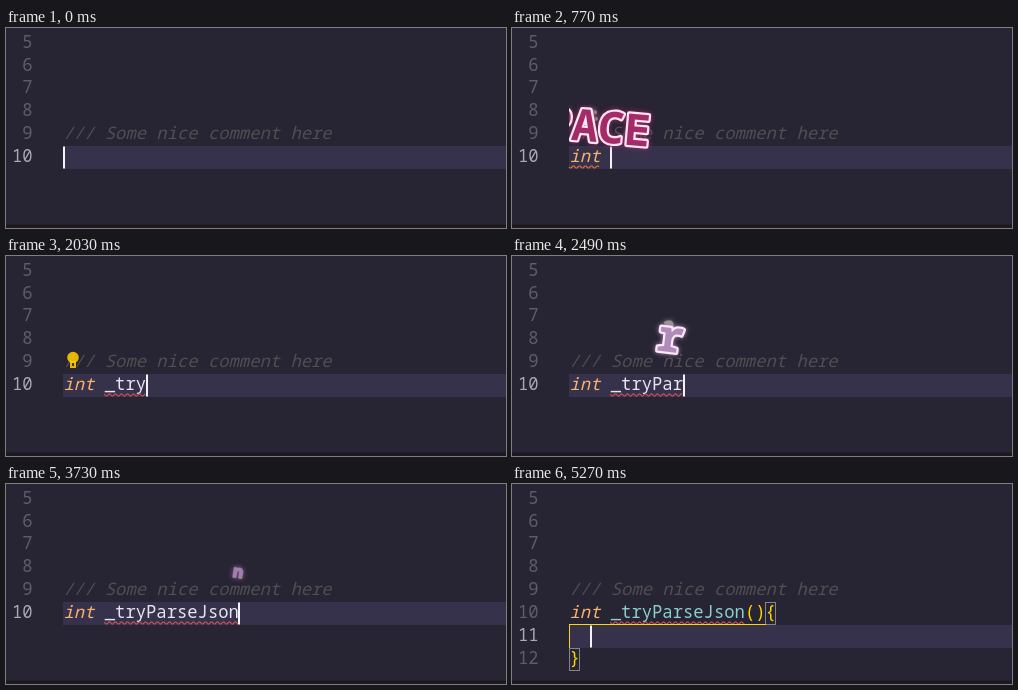
An HTML page with a canvas for the animation above (5430 ms loop, 500 by 200 pixels).

```html
<!DOCTYPE html>
<html>
<head>
<meta charset="utf-8">
<style>
html, body { margin: 0; width: 100%; height: 100%; overflow: hidden; background: #272433; }
canvas { display: block; }
</style>
</head>
<body>
<canvas id="stage" width="500" height="200"></canvas>
<script>
const ctx = document.getElementById('stage').getContext('2d');
const LOOP = 5430, LEFT = 57, CELL = 10.32, ROW = 22.85, LIFE = 330;
const MONO = '"Noto Sans Mono", "DejaVu Sans Mono", monospace';
const GOLD = '#ffd700', PINK = '#a52a68', LILAC = '#b08abb', GREY = '#a39e98';
const ENTER = 4940, SETTLED = 5270;

// time, typed text, label centre x and y, tilt in degrees, colour
const keys = [
  [300, 'i', 66, 91, -6, PINK],
  [415, 'n', 76, 90, 7, LILAC],
  [525, 't', 81, 88, -8, GREY],
  [700, ' ', 73, 97, 5, PINK],
  [1000, '_', 104, 100, 4, LILAC],
  [1160, 't', 112, 95, -7, GREY],
  [1400, 'r', 126, 78, 8, PINK],
  [1560, 'y', 139, 68, -5, LILAC],
  [2100, 'P', 150, 68, 6, PINK],
  [2250, 'a', 157, 70, -8, GREY],
  [2410, 'r', 158, 84, 7, LILAC],
  [2560, 's', 176, 92, -6, PINK],
  [2700, 'e', 186, 90, 5, GREY],
  [3110, 'J', 204, 62, -7, PINK],
  [3240, 's', 212, 74, 6, GREY],
  [3370, 'o', 222, 76, -5, PINK],
  [3490, 'n', 232, 89, 9, LILAC],
  [4040, '(', 243, 94, -6, PINK],
  [4325, ')', 262, 96, -7, GREY],
  [4660, '{', 260, 95, 6, LILAC],
  [ENTER, '\n', 262, 95, -4, PINK]
];
const labels = { ' ': 'SPACE', '\n': 'ENTER' };
const bulbTimes = [[1960, 2100], [2860, 3110], [3880, 4040], [4480, 4660]];

const rowY = n => 118 + (n - 10) * ROW;
const colX = c => LEFT + c * CELL;

function rect(x, y, w, h, color) {
  ctx.fillStyle = color;
  ctx.fillRect(x, y, w, h);
}

function write(str, col, line, color, style = '500') {
  ctx.font = `${style} 17.2px ${MONO}`;
  ctx.fillStyle = color;
  ctx.fillText(str, colX(col) + 0.5, rowY(line) + 16);
}

function bracketBox(col, line) {
  ctx.strokeStyle = '#85838c';
  ctx.lineWidth = 1;
  ctx.strokeRect(Math.round(colX(col)) + 0.5, Math.round(rowY(line)) + 0.5, 10, 22);
}

function squiggle(from, to, color) {
  ctx.beginPath();
  for (let x = colX(from); x <= colX(to); x++) {
    ctx.lineTo(x, 139 + 1.2 * Math.sin((x - LEFT) * Math.PI / 3));
  }
  ctx.strokeStyle = color;
  ctx.lineWidth = 1.1;
  ctx.stroke();
}

function bulb(alpha) {
  ctx.globalAlpha = alpha;
  ctx.fillStyle = '#ffcc00';
  ctx.beginPath();
  ctx.arc(67, 101.5, 5.8, 0, 7);
  ctx.fill();
  rect(64, 105, 6, 7, '#ffcc00');
  rect(66, 107, 2, 3, '#272433');
  ctx.globalAlpha = 1;
}

function sticker(age, ch, x, y, tilt, color) {
  if (age < 0 || age >= LIFE) return;
  const size = age < 50 ? 0.5 + age / 100 : Math.min(1, (LIFE - age) / 230);
  const label = labels[ch] || ch;
  const base = /^[a-z]$/.test(label) ? 12 : 16;
  ctx.save();
  ctx.globalAlpha = Math.min(1, 0.55 + size * 0.45);
  ctx.translate(x, y);
  ctx.rotate(tilt * Math.PI / 180);
  ctx.scale(size, size);
  ctx.font = `bold 44px ${MONO}`;
  ctx.textAlign = 'center';
  ctx.lineJoin = 'round';
  ctx.shadowColor = color;
  ctx.shadowBlur = 5;
  ctx.lineWidth = 4.5;
  // the outline takes on the label's own colour as it shrinks
  ctx.strokeStyle = size > 0.6 ? '#fbe6f2' : color;
  ctx.strokeText(label, 0, base);
  ctx.shadowBlur = 0;
  ctx.fillStyle = color;
  ctx.fillText(label, 0, base);
  ctx.restore();
}

function draw(t) {
  const count = keys.filter(k => k[0] <= t).length;
  const typed = keys.slice(0, count).map(k => k[1]).join('');
  const entered = t >= ENTER;
  const active = entered ? 11 : 10;

  rect(0, 0, 500, 200, '#272433');
  rect(LEFT, Math.round(rowY(active)), 443, 23, '#37324b');
  rect(0, 196.5, 500, 3.5, '#1e1720');

  ctx.textAlign = 'right';
  for (let n = 5; n <= (entered ? 12 : 10); n++) {
    write(n, -3, n, n === active ? '#aaa7b8' : '#5f5c6d', '400');
  }
  ctx.textAlign = 'left';
  write('/// Some nice comment here', 0, 9, '#514e53', 'italic 400');

  const type = typed.slice(0, 3), method = typed.slice(4, 17);
  if (type.length < 3) write(type, 0, 10, '#e7e4f0');
  else write(type, 0, 10, '#f7b26d', 'italic 500');
  write(method, 4, 10, t > 5150 ? '#8bcfc8' : '#e7e4f0');
  if (count >= 3 && count <= 4) squiggle(0, 3, '#d8743f');
  if (method) squiggle(4, count >= 18 && count < 20 ? 19.6 : 4 + method.length, '#d5535a');

  if (count >= 18) {
    write('()', 17, 10, GOLD);
    if (count < 20) {
      bracketBox(17, 10);
      bracketBox(18, 10);
    }
  }
  if (count >= 20) {
    write('{', 19, 10, GOLD);
    if (!entered || t >= SETTLED) bracketBox(19, 10);
    const col = entered ? 0 : 20, line = entered ? 12 : 10;
    write('}', col, line, GOLD);
    bracketBox(col, line);
  }
  if (entered) {
    rect(57, 140, 197, 1, GOLD);
    rect(57, 141, 1, 23, GOLD);
  }

  const lit = bulbTimes.find(([a, b]) => t >= a && t < b);
  if (lit) bulb(lit === bulbTimes[0] ? 0.88 : 1);

  if (t < 70 || t >= 300) {
    const x = Math.round(colX(entered ? 2 : count));
    rect(x, Math.round(rowY(active)) + 0.5, 2, 22, '#f4f2fa');
  }

  ctx.save();
  ctx.beginPath();
  ctx.rect(LEFT, 0, 443, 196);
  ctx.clip();
  for (const [start, ...rest] of keys) sticker(t - start, ...rest);
  ctx.restore();
}

const begin = performance.now();
function frame() {
  draw((performance.now() - begin) % LOOP);
  requestAnimationFrame(frame);
}
frame();
</script>
</body>
</html>
```
